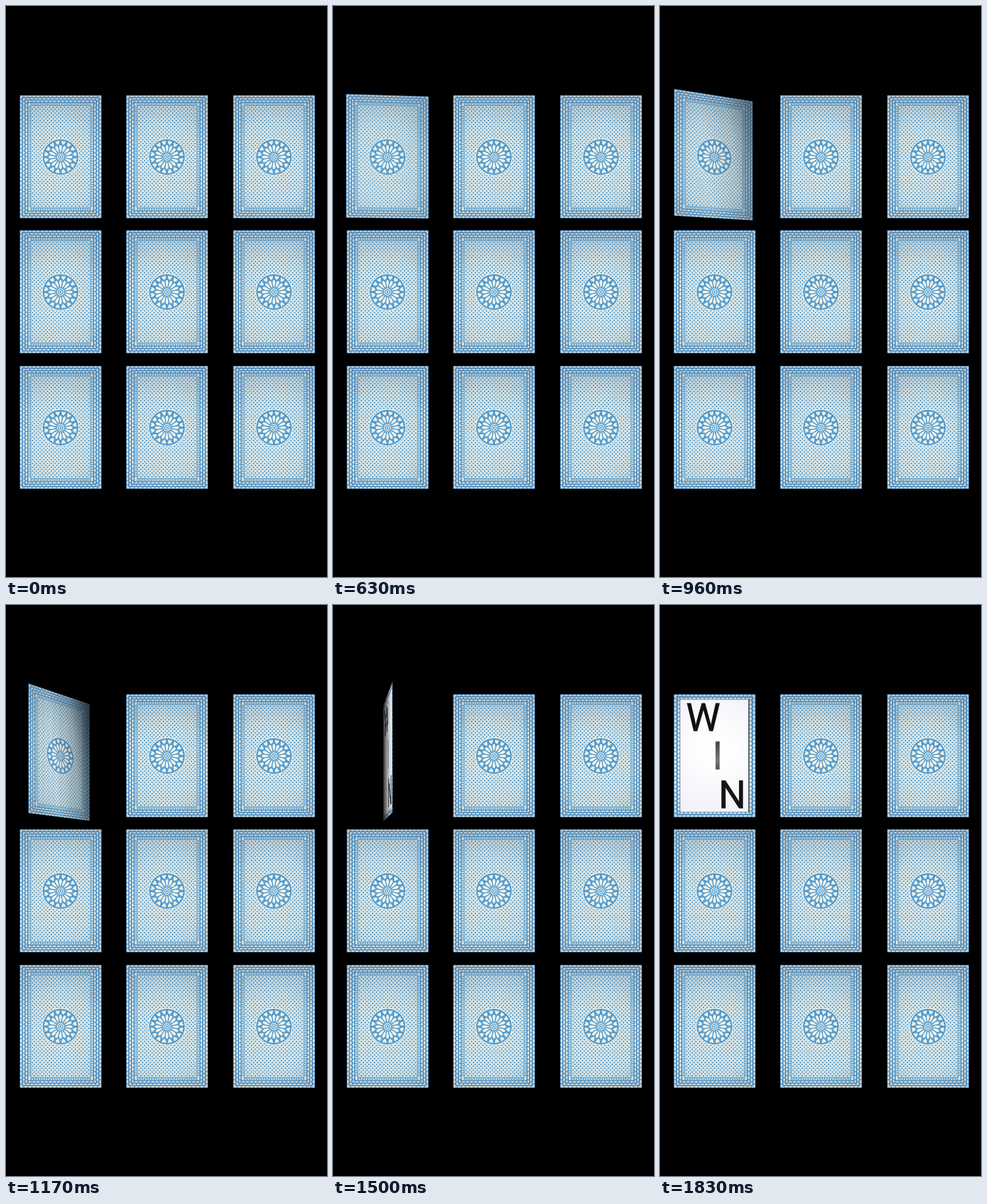
Recreate the animation shown at these times as an HTML page with a canvas. Size 561 by 998 pixels, loop 1870 ms.

```html
<!DOCTYPE html>
<html lang="en">
<head>
<meta charset="utf-8">
<title>Nine cards</title>
<style>
  html, body { margin: 0; width: 100%; height: 100%; overflow: hidden; background: #000; }
  #stage { position: relative; width: 561px; height: 998px; overflow: hidden; background: #000; perspective: 1075px; perspective-origin: 280.5px 499px; }
  .card { position: absolute; width: 143px; height: 215px; }
  .flip { transform-style: preserve-3d; }
  .face { position: absolute; inset: 0; backface-visibility: hidden; overflow: hidden; }
  .front { transform: rotateY(180deg); }
  .face > *, .card > canvas { position: absolute; left: 0; top: 0; width: 143px; height: 215px; }
  .back .shade { background: linear-gradient(82deg, rgba(0,0,0,.1) 0%, rgba(0,0,0,.03) 40%, rgba(0,0,0,.28) 70%, rgba(0,0,0,.92) 100%); }
  .front .shade { background: linear-gradient(90deg, rgba(0,0,0,.85) 0%, rgba(0,0,0,.5) 35%, rgba(0,0,0,.12) 75%, rgba(0,0,0,.05) 100%); }
  text { font: 400 67.5px Roboto, "Open Sans", sans-serif; text-anchor: middle; stroke-width: .8px; }
</style>
</head>
<body>
<div id="stage"></div>
<script>
const W = 143, H = 215, SCALE = 2;
const BLUE = '#4896cb', EDGE = '#4a8fc4', CREAM = '#f3f3e8';
const stage = document.getElementById('stage');

function add(parent, tag, cls) {
  const el = document.createElement(tag);
  if (cls) el.className = cls;
  return parent.appendChild(el);
}

function disc(c, r, color) {
  c.fillStyle = color;
  c.beginPath();
  c.arc(0, 0, r, 0, 7);
  c.fill();
}

function star(c, x, y, r, pinch) {
  const k = r * pinch;
  c.moveTo(x + r, y);
  c.quadraticCurveTo(x + k, y + k, x, y + r);
  c.quadraticCurveTo(x - k, y + k, x - r, y);
  c.quadraticCurveTo(x - k, y - k, x, y - r);
  c.quadraticCurveTo(x + k, y - k, x + r, y);
}

// One mitred side: strands of pale lenses on blue
function side(c, len, depth, miter, strands) {
  c.save();
  c.beginPath();
  c.moveTo(0, 0);
  c.lineTo(len, 0);
  c.lineTo(len - miter, depth);
  c.lineTo(miter, depth);
  c.clip();
  c.fillStyle = EDGE;
  c.fillRect(0, 0, len, depth);
  const band = depth / strands, step = len / Math.round(len / 7.2);
  c.fillStyle = '#ecf1e8';
  c.beginPath();
  for (let s = 0; s < strands; s++) {
    const y = band * (s + .5), a = band * .68;
    for (let x = (s % 2) * -step / 2; x < len; x += step) {
      c.moveTo(x, y);
      c.quadraticCurveTo(x + step / 2, y - a, x + step, y);
      c.quadraticCurveTo(x + step / 2, y + a, x, y);
    }
  }
  c.fill();
  c.restore();
}

function border(c, dx, dy, strands) {
  for (const half of [0, 1]) {
    c.save();
    c.translate(W / 2, H / 2);
    c.rotate(half * Math.PI);
    c.save();
    c.translate(-W / 2, -H / 2);
    side(c, W, dy, dx, strands);
    c.restore();
    c.rotate(-Math.PI / 2);
    c.translate(-H / 2, -W / 2);
    side(c, H, dx, dy, strands);
    c.restore();
  }
}

function lattice(c, x0, y0, w, h) {
  const cols = 32, rows = 54, sx = w / cols, sy = h / rows;
  c.save();
  c.beginPath();
  c.rect(x0, y0, w, h);
  c.clip();
  c.fillStyle = BLUE;
  c.beginPath();
  for (let j = 0; j <= rows; j++)
    for (let i = (j + 1) % 2; i <= cols; i += 2)
      star(c, x0 + i * sx, y0 + j * sy, sx, -.01);
  c.fill();
  c.restore();
}

function frames(c) {
  c.strokeStyle = BLUE;
  c.lineWidth = 1.4;
  c.strokeRect(14.4, 13, W - 28.8, H - 26);
  c.strokeRect(19.2, 17.8, W - 38.4, H - 35.6);
  c.fillStyle = BLUE;
  c.beginPath();
  for (let x = 20; x < W - 18; x += 4.12)
    for (const y of [15.4, H - 15.4]) star(c, x, y, 2.1, .2);
  for (let y = 20; y < H - 18; y += 4.12)
    for (const x of [16.8, W - 16.8]) star(c, x, y, 2.1, .2);
  c.fill();
}

function medallion(c) {
  const n = 16;
  c.save();
  c.translate(71.3, 108);
  disc(c, 32.6, CREAM);
  disc(c, 31.2, BLUE);
  for (let i = 0; i < n; i++) {
    c.save();
    c.rotate(i * 2 * Math.PI / n);
    c.fillStyle = CREAM;
    c.beginPath();
    c.moveTo(0, -7);
    c.bezierCurveTo(-1, -11, -3.4, -17, -1.7, -20);
    c.quadraticCurveTo(0, -22, 1.7, -20);
    c.bezierCurveTo(3.4, -17, 1, -11, 0, -7);
    c.fill();
    c.rotate(Math.PI / n);
    c.beginPath();
    c.moveTo(0, -21.4);
    c.bezierCurveTo(-2.6, -24, -4.8, -27.5, -2.3, -28.6);
    c.quadraticCurveTo(-.6, -29, 0, -26.6);
    c.quadraticCurveTo(.6, -29, 2.3, -28.6);
    c.bezierCurveTo(4.8, -27.5, 2.6, -24, 0, -21.4);
    c.fill();
    c.restore();
  }
  disc(c, 6.2, CREAM);
  disc(c, 4.9, BLUE);
  disc(c, 3.2, CREAM);
  disc(c, 1.8, BLUE);
  c.restore();
}

// Soft falloff: bright middle, greyer towards the edges
function glow(c) {
  const g = c.createRadialGradient(66, 125, 20, 66, 120, 140);
  g.addColorStop(0, 'rgba(255,255,255,.1)');
  g.addColorStop(.3, 'rgba(235,240,240,.05)');
  g.addColorStop(.6, 'rgba(100,125,150,.14)');
  g.addColorStop(1, 'rgba(80,105,145,.3)');
  c.fillStyle = g;
  c.fillRect(0, 0, W, H);
}

function paintBack(c) {
  border(c, 14, 12.5, 3);
  c.fillStyle = CREAM;
  c.fillRect(14, 12.5, W - 28, H - 25);
  lattice(c, 19.2, 17.8, W - 38.4, H - 35.6);
  frames(c);
  medallion(c);
  glow(c);
}

function paintFront(c) {
  border(c, 11.5, 9.5, 2);
  glow(c);
  const g = c.createRadialGradient(72, 95, 40, 72, 100, 125);
  g.addColorStop(0, '#fdfcfe');
  g.addColorStop(1, '#f1f0f8');
  c.fillStyle = g;
  c.fillRect(11.5, 9.5, W - 24, H - 19);
}

function sheet(parent, paint) {
  const cv = add(parent, 'canvas');
  cv.width = W * SCALE;
  cv.height = H * SCALE;
  const c = cv.getContext('2d');
  c.scale(SCALE, SCALE);
  paint(c);
}

let flip;
const shades = [];
for (let i = 0; i < 9; i++) {
  const card = add(stage, 'div', i ? 'card' : 'card flip');
  card.style.left = 24 + (i % 3) * 186.25 + 'px';
  card.style.top = 155.5 + Math.floor(i / 3) * 236.5 + 'px';
  if (i) {
    sheet(card, paintBack);
    continue;
  }
  flip = card;
  const back = add(card, 'div', 'face back'), front = add(card, 'div', 'face front');
  sheet(back, paintBack);
  sheet(front, paintFront);
  front.insertAdjacentHTML('beforeend', `<svg viewBox="0 0 143 215">
    <defs><linearGradient id="ink" x1="0" y1="0" x2="0" y2="1">
      <stop offset=".2" stop-color="#444"/><stop offset=".6" stop-color="#777"/><stop offset="1" stop-color="#333"/>
    </linearGradient></defs>
    <text x="51.5" y="64.3" fill="#111" stroke="#111">W</text>
    <text x="76.7" y="130.8" fill="url(#ink)" stroke="url(#ink)">I</text>
    <text x="102.3" y="198.6" fill="#151515" stroke="#151515">N</text></svg>`);
  shades.push(add(back, 'div', 'shade'), add(front, 'div', 'shade'));
}

const LOOP = 1870, STEP = 1000 / 24, START = 360, END = 44 * STEP;

function draw(now) {
  const t = Math.floor((now % LOOP + 5) / STEP) * STEP;
  const u = Math.min(1, Math.max(0, (t - START) / (END - START)));
  const angle = 180 * u ** 2.05;
  flip.style.transform = `rotateY(${angle}deg)`;
  const dim = Math.max(0, Math.sin(angle * Math.PI / 180)) ** 1.2;
  for (const s of shades) s.style.opacity = dim;
}

const begin = performance.now();
function tick() {
  draw(performance.now() - begin);
  requestAnimationFrame(tick);
}
tick();
</script>
</body>
</html>
```
